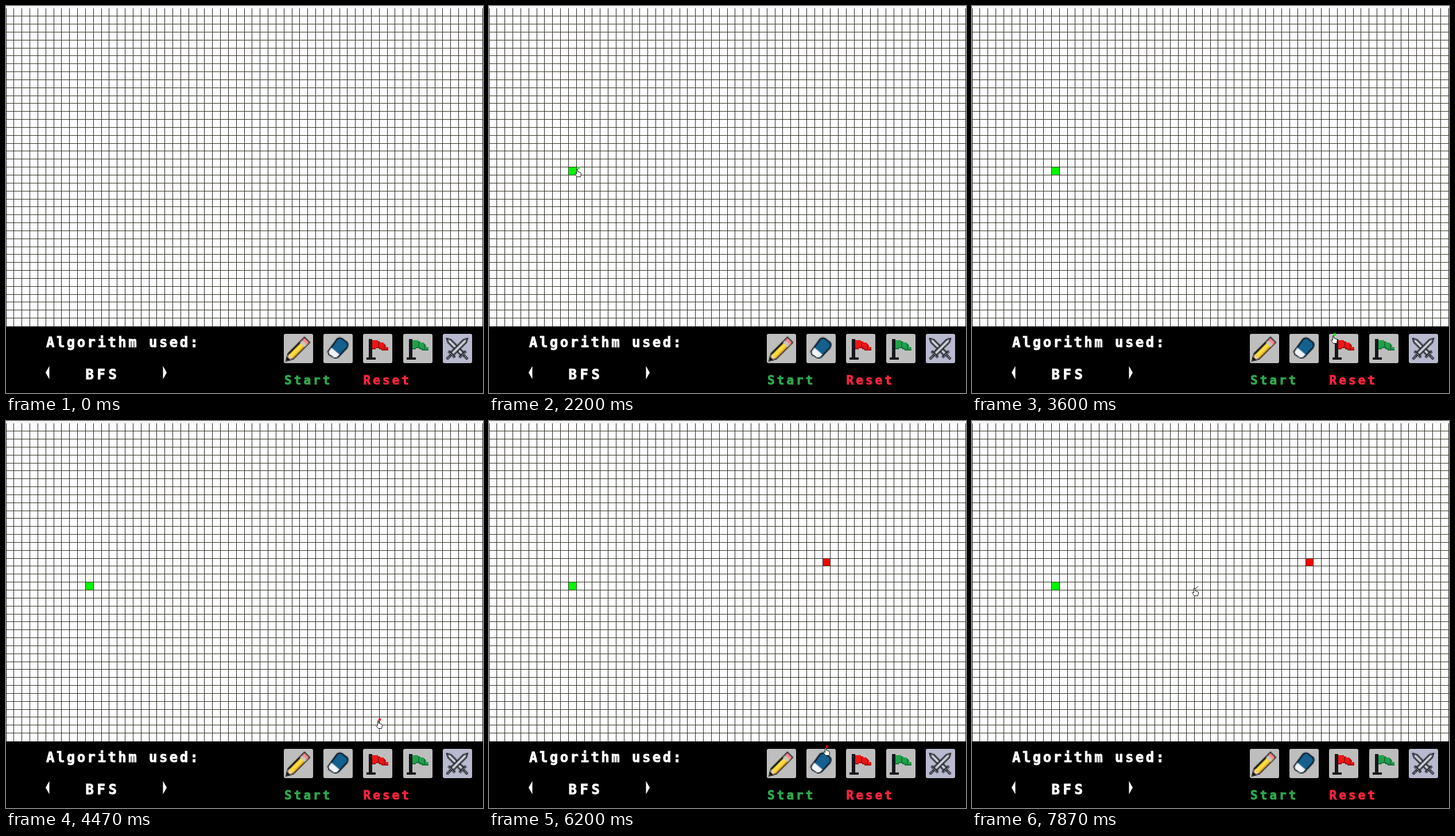
Recreate the animation shown at these times as an HTML page with a canvas. Size 831 px wide and 674 px high, loop 8 s.

```html
<!DOCTYPE html>
<html lang="en">
<head>
<meta charset="utf-8">
<title>Pathfinding grid</title>
<style>
  html, body { margin: 0; width: 100%; height: 100%; overflow: hidden; background: #000; }
  canvas { display: block; }
</style>
</head>
<body>
<canvas id="stage" width="831" height="674"></canvas>
<script>
const W = 831, H = 674, LOOP = 8000, STEP = 200 / 3;
const COLS = 60, ROWS = 40, CELL = 13.835, TOP = 3.96, PANEL = 558;
const GREEN = '#00f800', RED = '#fa0000';
const ctx = document.getElementById('stage').getContext('2d');

const colX = c => Math.floor(c * CELL);
const rowY = r => Math.floor(TOP + r * CELL);

function layer(w, h, draw) {
  const canvas = document.createElement('canvas');
  canvas.width = w;
  canvas.height = h;
  draw(canvas.getContext('2d'));
  return canvas;
}

function shape(g, d, fill, stroke, width = 1) {
  const path = new Path2D(d);
  if (fill) { g.fillStyle = fill; g.fill(path); }
  if (stroke) { g.strokeStyle = stroke; g.lineWidth = width; g.stroke(path); }
}

// Icons are drawn on a 25 x 25 grid and doubled for a pixel-art look.
function pencil(g) {
  shape(g, 'M2.5 22.5L4 17L18 3L22 7L8 21Z', '#fbdc40', '#111', 1.6);
  shape(g, 'M7 20L19 8L21 8L8 21Z', '#e8ad2a');
  shape(g, 'M2.5 22.5L4 17L8 21Z', '#edcfa0');
  shape(g, 'M2 23L3 19.5L5.5 22Z', '#111');
  shape(g, 'M14 7L18 11L20 9L16 5Z', '#c4c8ca');
  shape(g, 'M16 5L18 3L22 7L20 9Z', '#f58a92');
}

function eraser(g) {
  shape(g, 'M4 15L12 4Q14 2.5 16 3.5L20.5 7Q22 9 20.5 11.5L13 19.5Q11 21 9 20L5 17.5Z', '#14608f', '#101c28', 1.3);
  shape(g, 'M4.5 15L7 11.5L14 17.5L12 19.5Q10 20.5 8.5 19.5L5 17Z', '#f2f4f6');
}

const flag = (main, dark) => g => {
  shape(g, 'M8 5H13V6H15V7H18V9H20V11H22V14H16V13H14V12H11V13H8Z', main);
  shape(g, 'M8 13H11V12H14V13H16V14H22V13H17V12H15V11H11V12H8ZM13 6H14V11H13ZM18 8H19V13H18Z', dark);
  shape(g, 'M5 4H8V20H11V22H3V20H5Z', '#15171a');
};

function swords(g) {
  for (const side of [1, -1]) {
    g.save();
    g.translate(12.5, 12.5);
    g.scale(side, 1);
    shape(g, 'M-9 -9L-5.5 -8L6 3.5L3.5 6L-8 -5.5Z', '#b9bdc9', '#25262c', 1.2);
    shape(g, 'M-7 -7L4.5 4.5', null, '#e4e6ec', .8);
    shape(g, 'M2 7.5L7.5 2M5 5L9 9', null, '#25262c', 2.2);
    shape(g, 'M3 7L7 3M6 6L8.5 8.5', null, '#878b97', .8);
    g.restore();
  }
}

function label(g, text, x, y, size, advance, color) {
  g.font = `bold ${size}px "DejaVu Sans Mono", monospace`;
  g.letterSpacing = '0px';
  g.letterSpacing = advance - g.measureText('A').width + 'px';
  g.fillStyle = g.strokeStyle = color;
  g.lineWidth = .9;
  g.fillText(text, x, y);
  g.strokeText(text, x, y);
}

const board = layer(W, H, g => {
  g.fillStyle = '#fdfcff';
  g.fillRect(0, 0, W, H);
  g.fillStyle = '#f4f5f5';
  g.fillRect(0, 0, W, 4);
  g.fillStyle = '#35331f';
  for (let r = 1; r < ROWS; r++) g.fillRect(0, rowY(r), W, 1);
  g.fillStyle = '#292821';
  for (let c = 0; c <= COLS; c++) g.fillRect(colX(c), 4, 1, PANEL - 4);
  g.fillStyle = '#000';
  g.fillRect(0, PANEL, W, H - PANEL);

  label(g, 'Algorithm used:', 70, 594, 24, 17.9, '#fff');
  label(g, 'BFS', 138.5, 650, 24, 20, '#fff');
  label(g, 'Start', 485, 659, 21, 16.7, '#2fa84f');
  label(g, 'Reset', 622.5, 659, 21, 16.7, '#fa2440');
  shape(g, 'M75.5 627L69 638.5L75.5 650Z', '#fff');
  shape(g, 'M273.5 627L280 638.5L273.5 650Z', '#fff');

  g.imageSmoothingEnabled = false;
  const icons = [pencil, eraser, flag('#ee1515', '#a80f14'), flag('#21a04b', '#14723a'), swords];
  icons.forEach((icon, i) => {
    const x = Math.floor(484.4 + i * 69.2);
    g.fillStyle = icon === swords ? '#b9b9d0' : '#bebebe';
    g.beginPath();
    g.roundRect(x, 571, 51, 51, 3);
    g.fill();
    g.drawImage(layer(25, 25, icon), x, 572, 50, 50);
  });
});

// Pointer path: time, x, y of the brush mark.
const path = [
  [600, 760, 140], [667, 500, 200], [733, 325, 250], [867, 272, 255],
  [1067, 195, 266], [1330, 195, 266], [1733, 156, 282], [2200, 156, 282],
  [3000, 490, 465], [3600, 632, 572], [3867, 642, 590], [4200, 650, 545],
  [4467, 651, 520], [4867, 593, 262], [5133, 589, 242], [5533, 589, 242],
  [6200, 589, 567], [6400, 565, 588], [6733, 510, 596], [7070, 510, 596],
  [7867, 390, 289]
];

function pointerAt(t) {
  const next = path.findIndex(p => p[0] > t);
  if (next < 0) return path[path.length - 1].slice(1);
  const [t0, x0, y0] = path[next - 1], [t1, x1, y1] = path[next];
  const k = (t - t0) / (t1 - t0);
  return [x0 + (x1 - x0) * k, y0 + (y1 - y0) * k];
}

function fillCell(col, row, color) {
  const x = colX(col) + 1, y = rowY(row) + 1;
  ctx.fillStyle = color;
  ctx.fillRect(x, y, colX(col + 1) - x, rowY(row + 1) - y);
}

function drawPointer(t) {
  const [x, y] = pointerAt(t).map(Math.round);
  ctx.save();
  ctx.translate(x, y);
  shape(ctx, 'M-3.5 2.5H-1.5V6.5L3.5 8L4.5 10L3.5 15.5H-2.5L-6.5 10.5L-5.5 9L-3.5 10.5Z', '#fff', '#111');
  if (t < 6730) {
    ctx.fillStyle = t < 3870 ? GREEN : RED;
    ctx.fillRect(-2, -2, 4, 4);
  } else {
    shape(ctx, 'M-2 4L4 -1', null, '#111');
  }
  ctx.restore();
}

function frame(now) {
  const t = Math.floor((now % LOOP) / STEP + .1) * STEP + .5;
  ctx.drawImage(board, 0, 0);
  if (t > 1866) fillCell(10, 20, GREEN);
  if (t > 5266) fillCell(42, 17, RED);
  if (t >= 600) drawPointer(t);
  requestAnimationFrame(frame);
}
requestAnimationFrame(frame);
</script>
</body>
</html>
```
